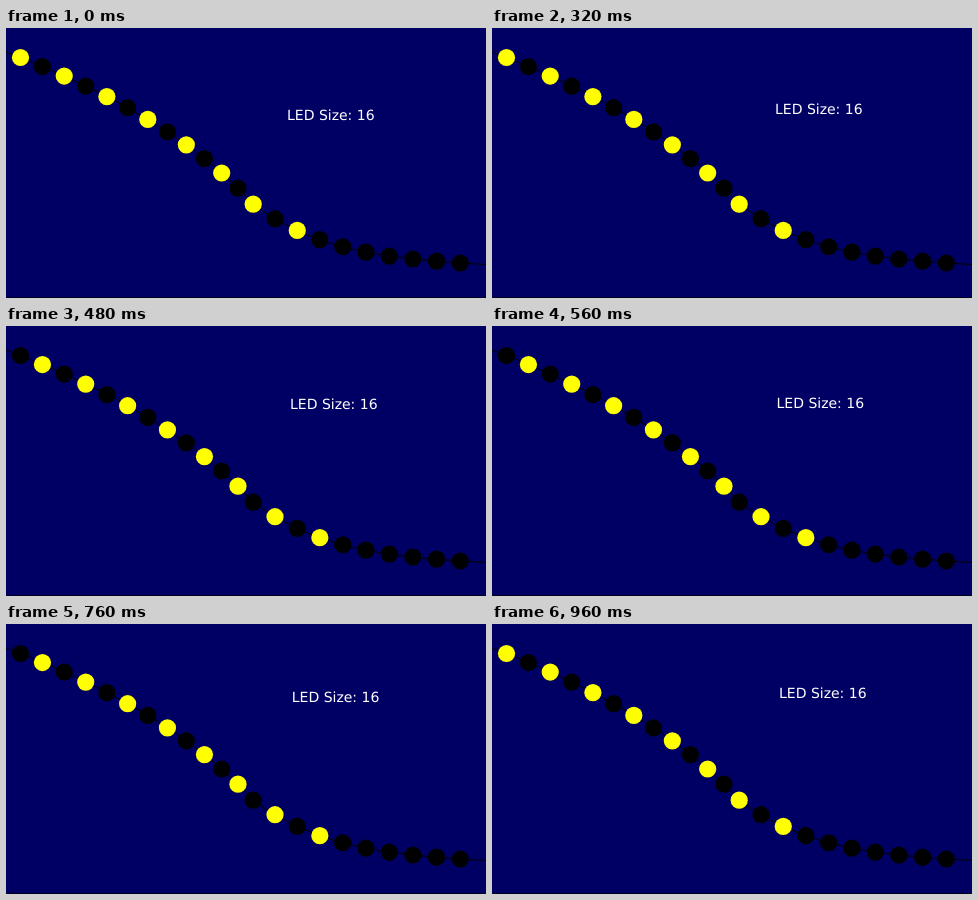
Animation, 480 px wide and 270 px high, one loop 1000 ms. Source, as an HTML page:

```html
<!DOCTYPE html>
<html lang="en">
<head>
<meta charset="utf-8">
<title>LED string</title>
<style>
  @property --tick { syntax: "<number>"; inherits: false; initial-value: 0; }
  html, body { margin: 0; width: 100%; height: 100%; overflow: hidden; background: #000064; }
  svg { display: block; width: 480px; height: 270px; }
  .wire { fill: none; stroke: #000; stroke-width: 1; }
  .even, .odd { animation: even 1s step-end infinite; }
  .odd { animation-name: odd; }
  text {
    font: 14px "DejaVu Sans", sans-serif;
    fill: #fff;
    text-rendering: geometricPrecision;
    transform: translate(calc(var(--tick) * .25px), calc(var(--tick) * -.73px));
    animation: drift 1s steps(25) infinite;
  }
  @keyframes even { 0%, 96%, 100% { fill: #ff0; } 48% { fill: #000; } }
  @keyframes odd { 0%, 96%, 100% { fill: #000; } 48% { fill: #ff0; } }
  @keyframes drift { to { --tick: 25; } }
</style>
</head>
<body>
<svg viewBox="0 0 480 270">
  <rect width="480" height="270" fill="#000064"/>
  <rect y="269" width="480" height="1" fill="#000020"/>
  <path class="wire"/>
  <g id="leds"></g>
  <text x="281" y="92">LED Size: 16</text>
</svg>
<script>
  const LIT = 16;
  // Two Bezier halves of the wire, each with its count of LED gaps
  const bend = [247.2, 176.2];
  const halves = [
    { gaps: 12, pts: [[14.5, 29.5], [102.5, 64.7], [188.5, 110.6], bend] },
    { gaps: 9, pts: [bend, [312, 224.3], [383, 229.7], [454.3, 235]] }
  ];

  const bezier = ([a, b, c, d], t) => [0, 1].map(k => {
    const s = 1 - t;
    return a[k] * s ** 3 + 3 * b[k] * s * s * t + 3 * c[k] * s * t * t + d[k] * t ** 3;
  });

  const curves = halves.map(({ pts }) => `L${pts[0]}C${pts.slice(1)}`).join('');
  document.querySelector('.wire').setAttribute('d', `M0 24${curves}L480 236.5`);

  const group = document.getElementById('leds');
  let count = 0;
  function addLed([x, y]) {
    const led = document.createElementNS('http://www.w3.org/2000/svg', 'circle');
    led.setAttribute('cx', x);
    led.setAttribute('cy', y);
    led.setAttribute('r', 8.6);
    if (count < LIT) led.setAttribute('class', count % 2 ? 'odd' : 'even');
    group.append(led);
    count++;
  }

  addLed(halves[0].pts[0]);
  for (const { gaps, pts } of halves) {
    for (let i = 1; i <= gaps; i++) addLed(bezier(pts, i / gaps));
  }
</script>
</body>
</html>
```
